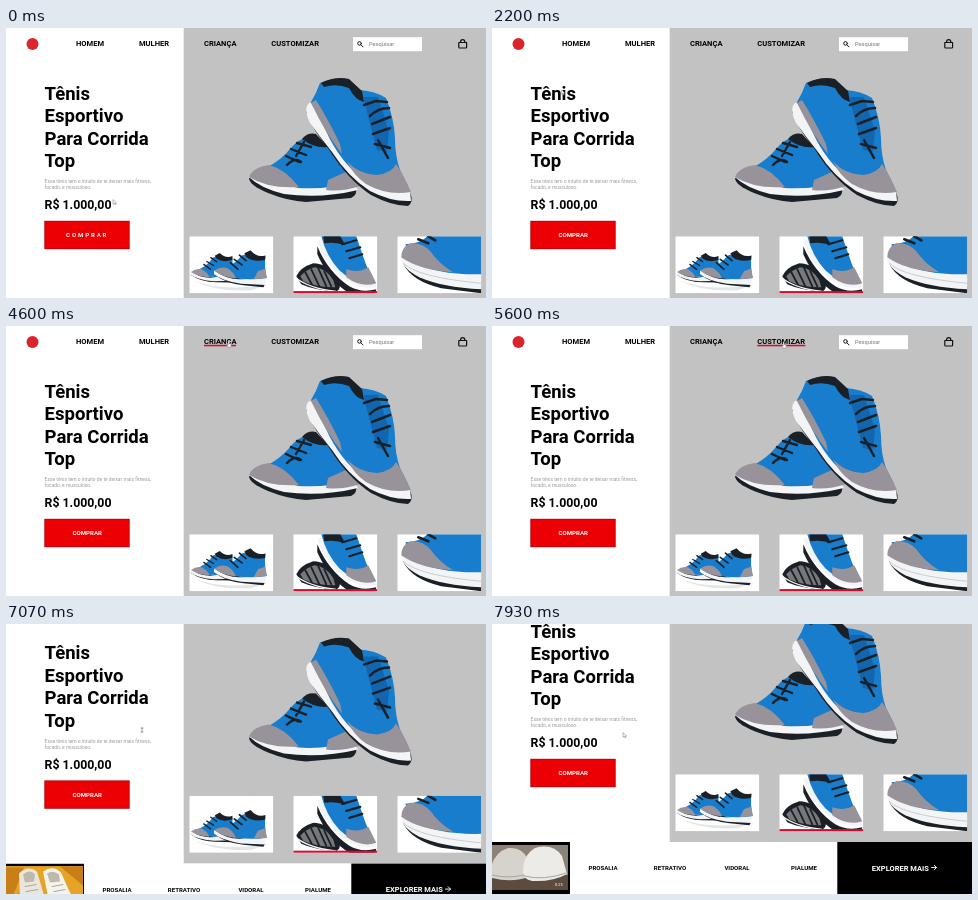
Write an HTML page with a canvas that moves like this. It is 480 px wide and 270 px high and loops after 8 s.

```html
<!DOCTYPE html>
<html lang="pt-BR">
<head>
<meta charset="utf-8">
<title>Loja de tênis</title>
<style>
html, body { margin: 0; width: 100%; height: 100%; overflow: hidden; background: #fff; }
canvas { display: block; width: 480px; height: 270px; }
</style>
</head>
<body>
<canvas id="stage"></canvas>
<script>
const LOOP = 8000, W = 480, H = 270;
const RED = '#ed0004', BLUE = '#177dcc', NAVY = '#1266b0', GREY = '#98939a',
      PANEL = '#c2c2c2', DARK = '#1b2027', SOLE = '#f3f4f5';
const canvas = document.getElementById('stage');
const ctx = canvas.getContext('2d');
const dpr = window.devicePixelRatio || 1;
canvas.width = W * dpr;
canvas.height = H * dpr;

const clamp = v => Math.max(0, Math.min(1, v));
const span = (t, from, to) => clamp((t - from) / (to - from));
const easeOut = p => 1 - (1 - p) ** 2;
const easeBoth = p => p * p * (3 - 2 * p);

function rect(color, x, y, w, h) {
  ctx.fillStyle = color;
  ctx.fillRect(x, y, w, h);
}
function shape(color, d) {
  ctx.fillStyle = color;
  ctx.fill(new Path2D(d));
}
function line(color, width, d) {
  ctx.strokeStyle = color;
  ctx.lineWidth = width;
  ctx.stroke(new Path2D(d));
}
function text(str, x, y, size, { color = '#000', weight = 700, align = 'left', gap = 0 } = {}) {
  ctx.font = `${weight} ${size}px Roboto, Arial, sans-serif`;
  ctx.letterSpacing = gap + 'px';
  ctx.textAlign = align;
  ctx.fillStyle = color;
  ctx.fillText(str, x, y);
}
function clipped(x, y, w, h, draw) {
  ctx.save();
  ctx.beginPath();
  ctx.rect(x, y, w, h);
  ctx.clip();
  ctx.translate(x, y);
  draw();
  ctx.restore();
}

// Hero product: one shoe lying down, one leaning on it
function lyingShoe() {
  shape(DARK, 'M243 150 Q243 157 262 165 Q282 173 300 174 L345 170 Q352 167 350 158 Z');
  shape(SOLE, 'M243 149 Q254 160 278 166 Q315 171 352 162 L346 152 L300 154 L250 144 Z');
  shape(BLUE, 'M262 139 Q276 131 284 121 Q292 111 304 108 L326 118 L350 153 Q322 162 292 160 L264 152 Z');
  shape(GREY, 'M243 149 Q247 139 263 137 Q279 141 293 159 Q262 161 243 149 Z');
  shape(GREY, 'M322 152 L342 143 L354 158 Q336 164 320 162 Z');
  shape(DARK, 'M296 111 Q302 104 310 106 L322 119 Q309 121 296 111 Z');
  line(DARK, 2.4, 'M280 128 l13 6 M285 121 l15 6 M291 115 l14 4 M281 137 q8 -8 14 -3 M298 114 l-8 14');
}
function leaningShoe() {
  shape(DARK, 'M300 83 Q304 98 322 120 Q341 151 365 167 Q386 178 402 178 Q408 174 404 164 Z');
  shape(SOLE, 'M303 75 Q297 81 304 95 Q314 109 326 124 Q342 149 364 163 Q385 174 405 173 L404 162 L360 148 L314 76 Z');
  shape(BLUE, 'M305 74 Q310 66 314 55 Q326 50 342 51 L354 62 Q369 63 380 70 Q388 90 389 110 Q389 128 394 142 L402 158 Q378 162 358 152 Q334 134 320 103 Q312 86 305 74 Z');
  shape(GREY, 'M341 133 Q352 146 371 147 Q386 145 390 136 Q396 144 405 164 Q381 168 360 156 Q347 147 341 133 Z');
  shape(GREY, 'M305 75 L310 72 Q322 91 334 116 L336 126 Q321 108 305 75 Z');
  shape(DARK, 'M315 55 Q329 48 343 51 L356 63 L358 74 Q349 72 343 60 Q330 55 318 59 Z');
  shape(NAVY, 'M357 69 L372 69 L383 103 L381 124 L371 122 Z');
  line(DARK, 2.5, 'M358 77 l12 -4 l11 1 M364 88 q8 -8 19 -8 M366 96 l18 -7 M367 106 l17 -6 M369 116 l15 4 M372 112 l10 18');
}

function sideShoe(x, y, size, turn) {
  ctx.save();
  ctx.translate(x, y);
  ctx.rotate(turn);
  ctx.scale(size, size);
  shape(DARK, 'M0 21 Q10 28 26 28 L43 28 L44 25 L0 20 Z');
  shape(SOLE, 'M0 18 Q12 25 24 23 L45 20 L44 26 L24 27 Q7 26 0 21 Z');
  shape(BLUE, 'M3 17 Q16 13 22 3 L29 0 Q34 5 42 2 Q42 12 45 20 Q25 25 7 21 Z');
  shape(GREY, 'M0 18 Q5 14 11 15 Q17 18 19 23 Q8 23 0 18 Z');
  shape(GREY, 'M37 15 L43 12 L45 20 L34 22 Z');
  shape(DARK, 'M24 1 L29 -2 Q35 4 42 1 L42 5 Q32 8 26 4 Z');
  line(DARK, 1.4, 'M13 10 l7 5 M16 7 l7 4 M20 3 l6 4');
  ctx.restore();
}

function pairThumb() {
  rect('#fff', 0, 0, 84, 57);
  shape('#e4e5e7', 'M4 44 Q32 56 80 48 L62 54 Q26 56 4 44 Z');
  sideShoe(2, 18, .98, .02);
  sideShoe(27, 13, 1.18, .1);
}

function soleThumb() {
  rect('#fff', 0, 0, 84, 57);
  shape(DARK, 'M24 10 Q35 36 56 50 Q68 57 83 53 L82 57 L56 57 Q36 45 24 18 Z');
  shape(SOLE, 'M24 4 Q28 22 46 39 Q64 55 83 51 L81 43 L58 34 L33 4 Z');
  shape(BLUE, 'M28 0 L63 0 Q69 18 73 29 L81 45 Q63 50 46 34 Q33 20 28 0 Z');
  shape(GREY, 'M53 33 Q66 37 75 31 L83 47 Q68 52 53 41 Z');
  shape(DARK, 'M30 0 L47 0 L52 9 Q42 5 31 7 Z');
  line(DARK, 2.2, 'M49 8 l14 -4 M53 15 l14 -4 M56 22 l13 -4');
  shape(DARK, 'M3 40 Q7 31 20 27 Q34 27 43 41 Q50 52 43 55 Q21 54 8 48 Z');
  shape('#77787c', 'M7 40 Q12 34 21 31 Q33 32 40 44 L42 51 Q22 51 10 45 Z');
  line(DARK, 1.8, 'M12 36 l7 13 M18 33 l8 17 M25 32 l8 18 M31 35 l7 15');
  line(SOLE, 1.4, 'M3 42 Q16 52 42 55');
  rect('#d8082f', 0, 54.8, 84, 2.2);
}

function toeThumb() {
  rect('#fff', 0, 0, 84, 57);
  shape(DARK, 'M6 28 Q15 45 44 52 L84 57 L84 50 L40 42 Z');
  shape(SOLE, 'M4 20 Q3 31 22 41 Q45 51 84 53 L84 36 L15 22 Z');
  line('#c9cbce', 1, 'M6 27 Q20 41 84 47');
  shape(BLUE, 'M8 8 Q24 7 30 0 L84 0 L84 38 Q41 39 16 26 Z');
  shape(GREY, 'M4 21 Q4 11 13 7 Q25 6 33 15 Q42 28 56 36 Q22 34 4 21 Z');
  line(DARK, 2.6, 'M21 3 l10 4 M31 0 l7 4');
}

function clip(t) {
  rect('#000', 0, 0, 78, 52);
  if (t < 7600) {
    rect('#e7a325', 0, 2.5, 77, 45);
    shape('#c87f18', 'M0 4 L18 4 L8 30 L0 33 Z M54 3 L77 3 L77 22 Z M54 44 L77 31 L77 47 Z');
    shape('#8b6a36', 'M12 29 Q28 48 68 43 L64 47 L15 47 Z');
    shape('#e9e6de', 'M13 10 Q22 1 31 8 L36 25 Q41 40 32 46 Q18 47 14 32 Z');
    shape('#f5f3ed', 'M37 8 Q47 1 55 9 L63 27 Q71 40 61 44 Q47 47 42 33 Z');
    shape('#beb9ac', 'M17 11 Q24 5 29 11 L28 18 L19 19 Z M41 10 Q47 6 53 11 L54 18 L44 19 Z');
    line('#aaa697', 1, 'M19 23 l11 -2 M20 28 l12 -2 M46 23 l11 -2 M48 28 l11 -2');
  } else {
    rect('#8d8278', 0, 3, 76, 45);
    shape('#5d4b3e', 'M0 36 L76 33 L76 48 L0 48 Z');
    shape('#d6d2cc', 'M0 22 Q4 10 16 6 Q31 5 36 18 L36 35 Q20 41 0 36 Z');
    shape('#edebe7', 'M31 30 Q31 13 43 6 Q61 1 70 14 L75 32 Q61 40 40 39 Q31 37 31 30 Z');
    line('#aaa59d', 1, 'M0 33 Q16 37 32 33 M32 34 Q52 39 74 31');
    text('0:25', 63, 44, 4, { color: '#fff', weight: 400 });
  }
}

// label, x, underline width, enter time, leave time
const NAV = [
  ['HOMEM', 70, 28, 2450, 3150],
  ['MULHER', 133, 30, 3320, 4150],
  ['CRIANÇA', 198, 32, 4270, 4950],
  ['CUSTOMIZAR', 265.3, 48, 5170, 5800]
];

function header(t) {
  ctx.fillStyle = '#d9252c';
  ctx.beginPath();
  ctx.arc(26.5, 16, 6, 0, 7);
  ctx.fill();
  for (const [label, x, width, enter, leave] of NAV) {
    text(label, x, 18.4, 7.55);
    const grow = easeOut(span(t, enter, enter + 350)) * (1 - easeOut(span(t, leave, leave + 400)));
    if (grow > 0) rect('#d8082f', x, 18.8, width * grow, 1.5);
  }
  rect('#fff', 347, 9.2, 69, 14);
  ctx.strokeStyle = '#111';
  ctx.lineWidth = 1;
  ctx.beginPath();
  ctx.arc(353.5, 15.4, 1.8, 0, 7);
  ctx.moveTo(354.9, 16.8);
  ctx.lineTo(357, 18.9);
  ctx.stroke();
  text('Pesquisar', 363, 18, 5.7, { color: '#777', weight: 400 });
  line('#111', 1.2, 'M452.8 14.5 H460.6 V19.2 Q460.6 20 459.8 20 H453.6 Q452.8 20 452.8 19.2 Z M454.5 14.5 Q454.5 11.7 456.7 11.7 Q458.9 11.7 458.9 14.5');
}

function product(t) {
  ['Tênis', 'Esportivo', 'Para Corrida', 'Top'].forEach((s, i) => text(s, 38.6, 71.8 + i * 22.5, 18.5));
  const small = { color: '#9a9a9a', weight: 400 };
  text('Esse tênis tem o intuito de te deixar mais fitness,', 38.6, 155, 4.92, small);
  text('focado, e musculoso.', 38.6, 161.2, 4.92, small);
  text('R$ 1.000,00', 38.6, 181, 12.3);
  rect('#b8000c', 38.3, 192.8, 85.4, 28.4);
  rect(RED, 39.1, 193.6, 83.8, 26.8);
  const gap = 1.85 * (1 - easeOut(span(t, 65, 420)));
  text('COMPRAR', 81.2, 209.2, 6.1, { color: '#fff', align: 'center', gap });
}

function footer(t) {
  rect('#fff', 0, 276, W, 52);
  clipped(0, 276, 78, 52, () => clip(t));
  ['PROSALIA', 'RETRATIVO', 'VIDORAL', 'PIALUME'].forEach((s, i) =>
    text(s, 111 + i * 67, 304, 6.1, { align: 'center' }));
  rect('#000', 345.3, 276, 135, 52);
  text('EXPLORER MAIS', 379.8, 304.6, 7.5, { color: '#fff' });
  line('#fff', .9, 'M439.5 301.5 h5 m-2.3 -2.3 l2.3 2.3 l-2.3 2.3');
}

// time, x, y
const PATH = [
  [0, 107, 172], [70, 107, 172], [800, 44.5, 134], [1800, 44.5, 134], [2500, 86, 16],
  [3070, 92, 16], [3270, 124, 12], [3450, 148, 16], [4050, 152, 16], [4400, 212, 16],
  [4600, 222, 15], [4870, 224, 16], [5250, 284, 16], [5700, 292, 16],
  [6530, 143, 99], [6670, 136, 106], [7780, 136, 106], [7880, 131, 109], [8000, 131, 109]
];

function pointer(t, scroll) {
  const i = PATH.findIndex(p => p[0] > t);
  const [a, b] = [PATH[i - 1], PATH[i]];
  const p = easeBoth(span(t, a[0], b[0]));
  const x = a[1] + (b[1] - a[1]) * p, y = a[2] + (b[2] - a[2]) * p;
  const overLink = scroll < 1 && NAV.some(n => y < 20 && x >= n[1] && x <= n[1] + n[2]);
  const overText = (t > 400 && t < 1850) || (t > 6500 && t < 7800);
  ctx.save();
  ctx.translate(x, y);
  if (overText) {
    line('#444', .5, 'M-1 -2 h2 M0 -2 v4 M-1 2 h2');
  } else {
    const d = overLink
      ? 'M0 0 q.8 -.5 1.2 .4 v2 l2 .6 v2 l-.8 1.3 h-2.2 l-1.6 -2.4 q.4 -.9 1.4 0 Z'
      : 'M0 0 V4.2 L1.1 3.3 L1.9 4.9 L2.6 4.5 L1.9 3.1 H3.2 Z';
    shape('#fff', d);
    line('#666', .45, d);
  }
  ctx.restore();
}

function render(t) {
  const scroll = 58 * (1 - Math.exp(-Math.max(0, t - 6980) / 92));
  ctx.setTransform(dpr, 0, 0, dpr, 0, 0);
  ctx.lineCap = ctx.lineJoin = 'round';
  rect('#fff', 0, 0, W, H);
  ctx.save();
  ctx.translate(0, -scroll);
  rect(PANEL, 177.7, 0, 303, 276);
  header(t);
  product(t);
  lyingShoe();
  leaningShoe();
  [pairThumb, soleThumb, toeThumb].forEach((draw, i) => clipped(183.3 + i * 104, 208.3, 84, 57, draw));
  footer(t);
  ctx.restore();
  pointer(t, scroll);
}

const start = performance.now();
function tick() {
  render((performance.now() - start) % LOOP);
  requestAnimationFrame(tick);
}
tick();
</script>
</body>
</html>
```
